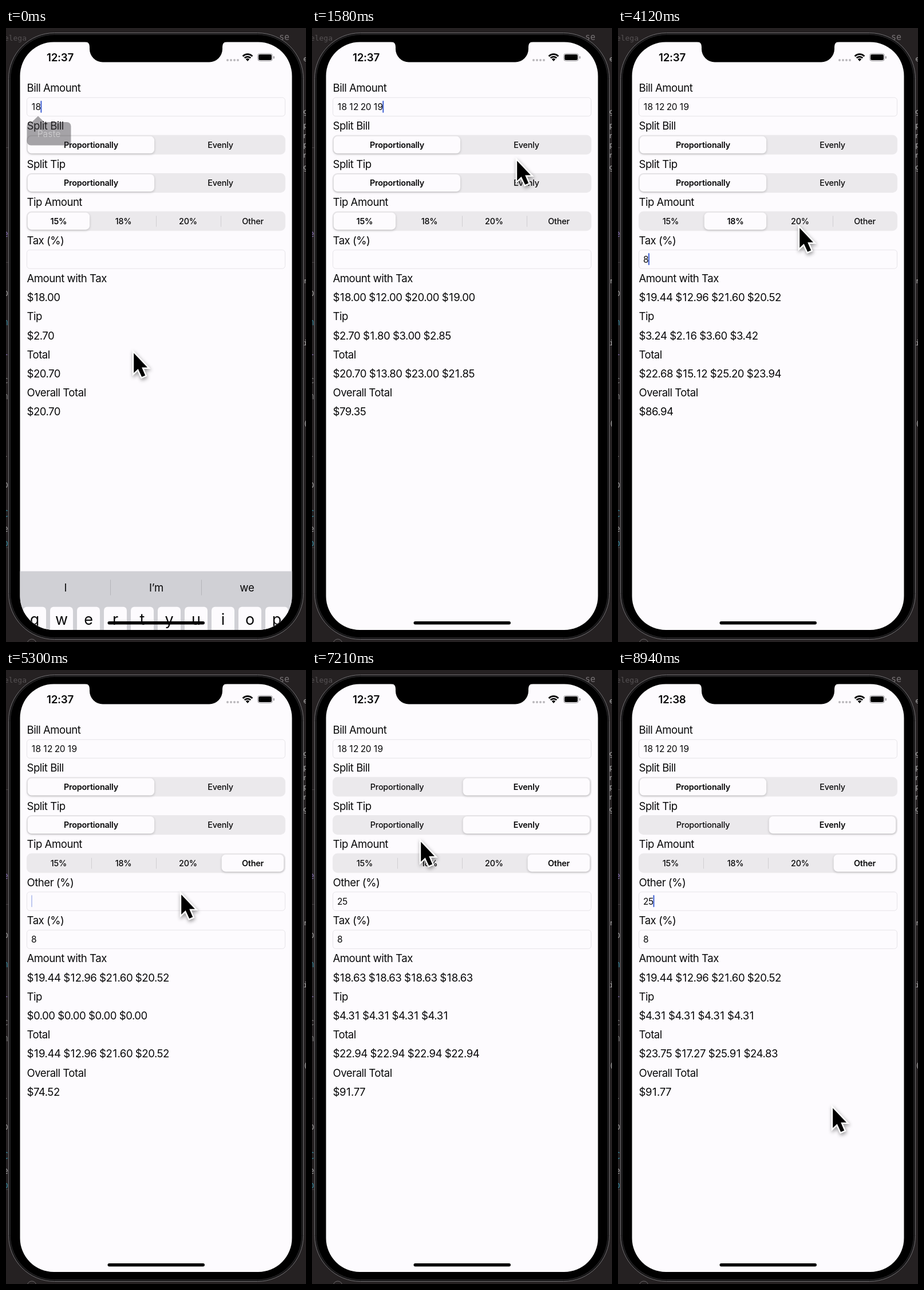
An HTML page with a canvas for the animation above (9 s loop, 524 px wide and 1070 px high).

```html
<!DOCTYPE html>
<html lang="en">
<head>
<meta charset="utf-8">
<title>Bill splitter</title>
<style>
html, body { margin: 0; width: 100%; height: 100%; overflow: hidden; background: #252122; }
canvas { display: block; }
</style>
</head>
<body>
<canvas id="stage" width="524" height="1070"></canvas>
<script>
const ctx = document.getElementById('stage').getContext('2d');
const LOOP = 9000, INK = '#09090a', PAPER = '#fdfbfe', ROW = 33.2;
const SCREEN = [24.5, 24.5, 475, 1024.5, 59];

// [time, value] steps; each value holds until the next one
const billSteps = [[0, '18'], [550, '18 '], [620, '18 1'], [700, '18 12'], [850, '18 12 '], [920, '18 12 2'],
  [985, '18 12 20'], [1050, '18 12 20 '], [1115, '18 12 20 1'], [1180, '18 12 20 19']];
const taxSteps = [[0, ''], [3180, '8']];
const otherSteps = [[0, ''], [5360, '2'], [5430, '25']];
const splitBill = [[0, 0], [6420, 1], [8100, 0]];
const splitTip = [[0, 0], [6750, 1]];
const tipChoice = [[0, 0], [3650, 1], [4650, 3]];
const focus = [[0, 'bill'], [2330, 'tax'], [4970, 'other']];
const clock = [[0, '12:37'], [8300, '12:38']];

// Pointer stops: time, x, y
const pointerPath = [[0, 222, 563], [1390, 222, 563], [1580, 357, 228], [1700, 350, 238], [2110, 82, 408],
  [2270, 122, 402], [2580, 122, 402], [2700, 113, 394], [3330, 113, 394], [3600, 204, 338], [3820, 206, 338],
  [4120, 316, 345], [4210, 333, 345], [4500, 430, 340], [4680, 431, 340], [4970, 305, 388], [5560, 305, 388],
  [6180, 428, 392], [6390, 378, 206], [6480, 378, 206], [6720, 376, 270], [6860, 374, 270], [7210, 189, 296],
  [7600, 165, 300], [8000, 185, 212], [8200, 185, 208], [8910, 484, 828]];

const clamp = v => Math.max(0, Math.min(1, v));
const smooth = v => { v = clamp(v); return v * v * (3 - 2 * v); };
const mix = (a, b, k) => a + (b - a) * k;
const stepAt = (steps, t) => steps.findLast(s => s[0] <= t);
const at = (steps, t) => stepAt(steps, t)[1];

function glide(steps, t) {
  const [start, value] = stepAt(steps, t);
  return start ? mix(at(steps, start - 1), value, smooth((t - start) / 110)) : value;
}

function box(x, y, w, h, r, fill, stroke) {
  ctx.beginPath();
  ctx.roundRect(x, y, w, h, r);
  if (fill) { ctx.fillStyle = fill; ctx.fill(); }
  if (stroke) { ctx.strokeStyle = stroke; ctx.lineWidth = 1; ctx.stroke(); }
}

function text(str, x, y, { size = 18.6, weight = 400, color = INK, align = 'left', gap = -0.5 } = {}) {
  ctx.font = `${weight} ${size}px Inter, "Liberation Sans", sans-serif`;
  ctx.letterSpacing = gap + 'px';
  ctx.textAlign = align;
  ctx.fillStyle = color;
  ctx.fillText(str, x, y + size * 0.363);
}

// Figures are set with a little room on both sides of each narrow "1"
function figures(str, x, y, style) {
  const start = x;
  for (const part of str.split(/(1)/)) {
    const room = part === '1' ? style.size * 0.055 : 0;
    text(part, x + room, y, style);
    x += ctx.measureText(part).width + room * 2;
  }
  return x - start;
}

function shadow(color, blur, x, y) {
  ctx.shadowColor = color;
  ctx.shadowBlur = blur;
  ctx.shadowOffsetX = x;
  ctx.shadowOffsetY = y;
}

function drawDesktop() {
  ctx.fillStyle = '#252122';
  ctx.fillRect(0, 0, 524, 1070);
  const code = (s, x, y, color, size = 15) => {
    ctx.font = `${size}px "DejaVu Sans Mono", monospace`;
    ctx.letterSpacing = '0px';
    ctx.textAlign = 'right';
    ctx.fillStyle = color;
    ctx.fillText(s, x, y);
  };
  code('delega', 36, 22, '#555153', 13);
  code('se', 495, 21, '#777375', 15);
  for (const [s, y, color] of [['e', 364, '#7e6aa8'], ['p', 467, '#999'], ['n', 518, '#328095'], ['l', 570, '#7e6aa8'],
    ['c', 619, '#777'], ['n', 647, '#777'], ['-', 751, '#777'], ['p', 801, '#999'], ['C', 852, '#328095'],
    ['e', 878, '#999'], ['o', 903, '#328095']]) code(s, 4, y, color);
  for (const [s, y] of [['e', 58], ['g', 150], ['p', 174], ['n', 192], ['p', 208], ['n', 226], ['g', 247],
    ['r', 445], ['i', 553], ['(', 694]]) code(s, 527, y, '#aaa', 13);
  ctx.fillStyle = '#454143';
  for (const y of [208, 408, 905]) ctx.fillRect(0, y, 5, 1);
  ctx.strokeStyle = '#6b6769';
  ctx.beginPath();
  ctx.arc(45, 1073, 8, 0, 7);
  ctx.stroke();
}

function drawPhone() {
  box(4.5, 8.5, 515, 1057, 80, '#161516', '#737174');
  box(7.5, 11.5, 509, 1051, 77, '#000', '#2b2a2c');
  box(...SCREEN, PAPER);
  ctx.fillStyle = '#000';
  ctx.beginPath();
  ctx.moveTo(138, 24);
  ctx.quadraticCurveTo(146, 24, 146, 33);
  ctx.arcTo(146, 59.5, 170, 59.5, 23);
  ctx.arcTo(378, 59.5, 378, 36, 23);
  ctx.lineTo(378, 33);
  ctx.quadraticCurveTo(378, 24, 386, 24);
  ctx.fill();
}

function drawStatus(t) {
  text(at(clock, t), 94.5, 51.5, { size: 18.8, weight: 600, align: 'center', gap: -0.3 });
  for (let i = 0; i < 4; i++) box(385 + i * 6, 54, 4, 4, 2, '#bab8bc');
  ctx.strokeStyle = ctx.fillStyle = '#000';
  ctx.lineWidth = 2.8;
  for (const r of [7.4, 11.8]) {
    ctx.beginPath();
    ctx.arc(422, 57.5, r, -Math.PI * 0.75, -Math.PI * 0.25);
    ctx.stroke();
  }
  ctx.beginPath();
  ctx.moveTo(422, 58);
  ctx.arc(422, 57.5, 4.6, -Math.PI * 0.75, -Math.PI * 0.25);
  ctx.fill();
  box(439.5, 44.5, 26, 13, 4, null, '#98969a');
  box(441, 46, 23, 10, 2.5, '#000');
  box(467, 49, 1.8, 4.5, 1, '#98969a');
}

function field(value, y, caret) {
  box(36.5, y - 16, 451, 32.5, 5, PAPER, '#e6e4e8');
  const width = figures(value, 44, y + 0.3, { size: 15.5, gap: -0.5 });
  if (!caret) return;
  ctx.globalAlpha = caret;
  box(44 + width - (value ? 0.2 : 0), y - 10.5, 2, 21, 1, '#3f60d3');
  ctx.globalAlpha = 1;
}

function segments(labels, steps, y, t) {
  const width = 452 / labels.length, chosen = at(steps, t);
  box(36, y - 17, 452, 34, 8.5, '#ebe9ec');
  ctx.fillStyle = '#d0ced2';
  for (let i = 1; i < labels.length; i++)
    if (i !== chosen && i !== chosen + 1) ctx.fillRect(36 + width * i, y - 9, 1, 19);
  shadow('rgba(0,0,0,.2)', 4, 0, 1.5);
  box(37.7 + width * glide(steps, t), y - 15, width - 4.6, 30, 7, PAPER);
  shadow('transparent', 0, 0, 0);
  labels.forEach((label, i) => text(label, 36 + width * (i + 0.5) - 0.5, y,
    { size: 14.4, weight: i === chosen ? 600 : 450, align: 'center', gap: -0.2 }));
}

function results(t) {
  const bills = at(billSteps, t).trim().split(' ').map(Number);
  const rate = [15, 18, 20, +at(otherSteps, t)][at(tipChoice, t)] / 100;
  const tax = 1 + at(taxSteps, t) / 100;
  const sum = list => list.reduce((a, b) => a + b, 0);
  const share = (list, even) => even ? list.map(() => sum(list) / list.length) : list;
  const taxed = share(bills.map(b => b * tax), at(splitBill, t));
  const tips = share(bills.map(b => b * rate), at(splitTip, t));
  const totals = taxed.map((v, i) => v + tips[i]);
  return [['Amount with Tax', taxed], ['Tip', tips], ['Total', totals], ['Overall Total', [sum(totals)]]];
}

function caretAlpha(name, t) {
  if (at(focus, t) !== name) return 0;
  if (name === 'bill') return 1;
  const typed = stepAt(name === 'tax' ? taxSteps : otherSteps, t)[0];
  const p = (t - Math.max(typed, stepAt(focus, t)[0])) % 700;
  return p < 580 ? 1 - clamp((p - 250) / 120) : (p - 580) / 120;
}

function drawForm(t) {
  let y = 104;
  const row = draw => { draw(y); y += ROW; };
  const label = str => row(y => text(str, 36.5, y + 0.3));
  const amounts = str => row(y => figures(str, 36.5, y + 0.3, { size: 18.6 }));
  const input = (name, steps) => row(y => field(at(steps, t), y, caretAlpha(name, t)));
  const choice = (labels, steps) => row(y => segments(labels, steps, y, t));
  label('Bill Amount');
  input('bill', billSteps);
  label('Split Bill');
  choice(['Proportionally', 'Evenly'], splitBill);
  label('Split Tip');
  choice(['Proportionally', 'Evenly'], splitTip);
  label('Tip Amount');
  choice(['15%', '18%', '20%', 'Other'], tipChoice);
  if (at(tipChoice, t) === 3) {
    label('Other (%)');
    input('other', otherSteps);
  }
  label('Tax (%)');
  input('tax', taxSteps);
  for (const [title, values] of results(t)) {
    label(title);
    amounts(values.map(v => '$' + v.toFixed(2)).join(' '));
  }
}

function drawPasteMenu(t) {
  if (t >= 180) return;
  ctx.globalAlpha = 1 - t / 180;
  ctx.fillStyle = 'rgba(60,58,62,.46)';
  ctx.beginPath();
  ctx.roundRect(36.5, 164, 77, 40.5, 7);
  ctx.moveTo(45, 164);
  ctx.lineTo(56, 153.5);
  ctx.lineTo(67, 164);
  ctx.fill();
  text('Paste', 75, 184.5, { size: 15.5, color: 'rgba(255,255,255,.42)', align: 'center', gap: 0 });
  ctx.globalAlpha = 1;
}

function drawKeyboard(t) {
  if (t >= 390) return;
  const top = 946 + 104 * (1 - (1 - t / 390) ** 2.4);
  ctx.save();
  ctx.beginPath();
  ctx.roundRect(...SCREEN);
  ctx.clip();
  ctx.fillStyle = '#d0d0d5';
  ctx.fillRect(24, top, 476, 110);
  ['I', 'I’m', 'we'].forEach((word, i) => text(word, 104 + i * 158.5, top + 29, { align: 'center', gap: -0.2 }));
  ctx.fillStyle = '#b5b5ba';
  for (const x of [182, 341]) ctx.fillRect(x, top + 15, 1, 27);
  [...'qwertyuiop'].forEach((key, i) => {
    const x = 50 + i * 47;
    box(x - 20, top + 63, 40, 54, 6, '#8d8d92');
    box(x - 20, top + 62, 40, 54, 6, PAPER);
    text(key, x, top + 84, { size: 27, align: 'center', gap: 0 });
  });
  ctx.restore();
}

function pointerAt(t) {
  if (t >= 8940) return [374, 760];
  const i = pointerPath.findLastIndex(p => p[0] <= t);
  const [t0, x0, y0] = pointerPath[i], [t1, x1, y1] = pointerPath[i + 1] || [LOOP, x0, y0];
  const k = smooth((t - t0) / (t1 - t0));
  return [mix(x0, x1, k), mix(y0, y1, k)];
}

function drawPointer(t) {
  const arrow = new Path2D('M1.2 3.5V38L8.7 31 15.2 45 21.2 42.4 15.2 28.5H25Z');
  ctx.save();
  ctx.translate(...pointerAt(t));
  ctx.lineWidth = 5;
  ctx.strokeStyle = '#fff';
  shadow('rgba(0,0,0,.42)', 6, 1, 3);
  ctx.stroke(arrow);
  shadow('transparent', 0, 0, 0);
  ctx.fillStyle = '#000';
  ctx.fill(arrow);
  ctx.restore();
}

function frame() {
  const t = performance.now() % LOOP;
  drawDesktop();
  drawPhone();
  drawStatus(t);
  drawForm(t);
  drawPasteMenu(t);
  drawKeyboard(t);
  box(177.5, 1034, 169.5, 5.5, 2.75, '#000');
  drawPointer(t);
  requestAnimationFrame(frame);
}
frame();
</script>
</body>
</html>
```
